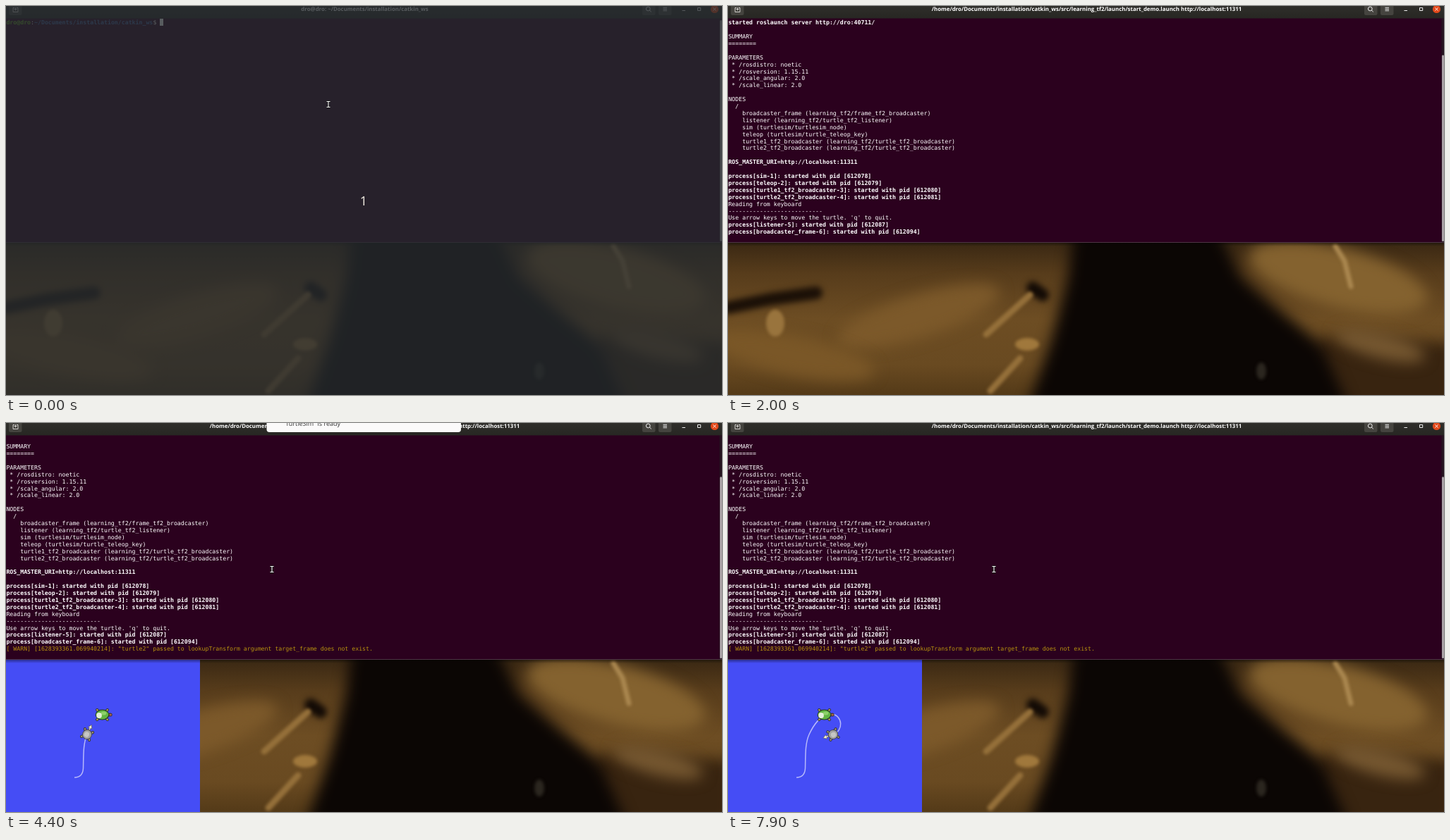
An HTML page with a canvas that plays this animation: 1015 by 552 pixels, repeating every 8 s.

```html
<!DOCTYPE html>
<html lang="en">
<head>
<meta charset="utf-8">
<title>Turtle follower demo</title>
<style>
  html, body { margin: 0; width: 100%; height: 100%; overflow: hidden; background: #000; }
  canvas { display: block; width: 1015px; height: 552px; }
</style>
</head>
<body>
<canvas id="stage" width="1015" height="552"></canvas>
<script>
const W = 1015, H = 552, LOOP = 8000, TICK = 100;
const ROWS = 32, ROW_H = 9.9, COL_W = 4.955, TOP = 18.2, TERM_BOTTOM = 336;
const MONO = '8.23px "DejaVu Sans Mono", monospace';
const UI = '"Open Sans", "Noto Sans", sans-serif';
const USER = 'dro';
const SHELL = `${USER}@${USER}`, CWD = '~/Documents/installation/catkin_ws';
const PROMPT_COLS = (SHELL + ':' + CWD + '$ ').length;
const LAUNCH_FILE = `/home/${USER}/Documents/installation/catkin_ws/src/learning_tf2/launch/start_demo.launch`;

// Lines starting with "!" are bold, with "?" are warnings.
const OUTPUT = `... logging to /home/${USER}/.ros/log/5c1e7a02-f7f1-11eb-9d3c-2b6f04a81e57/roslaunch-${USER}-612063.log
Checking log directory for disk usage. This may take a while.
Press Ctrl-C to interrupt
Done checking log file disk usage. Usage is <1GB.

!started roslaunch server http://${USER}:40711/

SUMMARY
========

PARAMETERS
 * /rosdistro: noetic
 * /rosversion: 1.15.11
 * /scale_angular: 2.0
 * /scale_linear: 2.0

NODES
  /
    broadcaster_frame (learning_tf2/frame_tf2_broadcaster)
    listener (learning_tf2/turtle_tf2_listener)
    sim (turtlesim/turtlesim_node)
    teleop (turtlesim/turtle_teleop_key)
    turtle1_tf2_broadcaster (learning_tf2/turtle_tf2_broadcaster)
    turtle2_tf2_broadcaster (learning_tf2/turtle_tf2_broadcaster)

!ROS_MASTER_URI=http://localhost:11311

!process[sim-1]: started with pid [612078]
!process[teleop-2]: started with pid [612079]
!process[turtle1_tf2_broadcaster-3]: started with pid [612080]
!process[turtle2_tf2_broadcaster-4]: started with pid [612081]
Reading from keyboard
---------------------------
Use arrow keys to move the turtle. 'q' to quit.
!process[listener-5]: started with pid [612087]
!process[broadcaster_frame-6]: started with pid [612094]
?[ WARN] [1628393361.069940214]: "turtle2" passed to lookupTransform argument target_frame does not exist.`.split('\n');

const ctx = document.getElementById('stage').getContext('2d');
const clamp = (v, lo = 0, hi = 1) => Math.min(hi, Math.max(lo, v));

// Value of the last [time, value] step that has been reached.
const at = (t, steps) => steps.filter(s => s[0] <= t).pop()[1];

function rect(x, y, w, h, color, radius = 0, c = ctx) {
  c.fillStyle = color;
  c.beginPath();
  c.roundRect(x, y, w, h, radius);
  c.fill();
}

function ellipse(x, y, rx, ry, color, angle = 0, c = ctx) {
  c.fillStyle = color;
  c.beginPath();
  c.ellipse(x, y, rx, ry, angle, 0, 7);
  c.fill();
}

function stroke(d, color, width = 1, c = ctx) {
  c.strokeStyle = color;
  c.lineWidth = width;
  c.stroke(new Path2D(d));
}

function text(s, x, y, font, color, align = 'left') {
  ctx.font = font;
  ctx.fillStyle = color;
  ctx.textAlign = align;
  ctx.fillText(s, x, y);
}

// Wallpaper: sunlit straw with a dark shadow, reduced to soft shapes.
const wallpaper = (() => {
  const cv = document.createElement('canvas');
  cv.width = W;
  cv.height = H;
  const c = cv.getContext('2d');
  const g = c.createLinearGradient(0, TERM_BOTTOM, 0, H);
  [[0, '#3a2813'], [.2, '#573c1b'], [.5, '#6d4d23'], [.8, '#694a21'], [1, '#543a18']]
    .forEach(stop => g.addColorStop(...stop));
  rect(0, 320, W, H, g, 0, c);
  c.filter = 'blur(10px)';
  ellipse(865, 385, 130, 42, '#84622f', .25, c);
  ellipse(270, 440, 120, 30, '#7c592a', -.3, c);
  ellipse(90, 495, 120, 28, '#7a5727', .2, c);
  c.fillStyle = '#382410';
  c.fill(new Path2D('M840 470L1030 478V570H780Z'));
  ellipse(925, 482, 65, 18, '#755730', .25, c);
  c.fillStyle = '#0b0604';
  c.fill(new Path2D('M490 320H695L728 385 780 430 840 480 880 570H425L458 475 482 385Z'));
  c.filter = 'blur(4px)';
  c.lineCap = 'round';
  stroke('M0 428L60 416 125 407', '#1b1007', 18, c);
  stroke('M432 400L446 410', '#120a05', 18, c);
  c.filter = 'blur(2px)';
  stroke('M366 466L428 410M372 546L414 500', '#95703a', 9, c);
  stroke('M861 341L874 362 883 398', '#ab8850', 7, c);
  ellipse(67, 450, 13, 19, '#99743d', 0, c);
  ellipse(424, 480, 17, 9, '#a0783c', 0, c);
  ellipse(756, 518, 7, 12, '#2b261f', 0, c);
  return cv;
})();

// Three legs of the follower's route and the times at which they begin and end.
const LEGS = [
  'M97 503C104 503 109 499 109.5 490C110 474 109 455 115 442',
  'C120 431 132 411 147 413',
  'C163 415 164 437 149 442'];
const LEG_TIMES = [3100, 4400, 5800, 7900];
const route = document.createElementNS('http://www.w3.org/2000/svg', 'path');
const legEnds = [0, ...LEGS.map((_, i) => {
  route.setAttribute('d', LEGS.slice(0, i + 1).join(''));
  return route.getTotalLength();
})];
const trail = new Path2D(LEGS.join(''));

function travelled(t) {
  return LEGS.reduce((sum, _, i) => sum + (legEnds[i + 1] - legEnds[i]) *
    clamp((t - LEG_TIMES[i]) / (LEG_TIMES[i + 1] - LEG_TIMES[i])), 0);
}

function turtle(x, y, angle, drawBody) {
  ctx.save();
  ctx.translate(x, y);
  ctx.rotate(angle);
  drawBody();
  ctx.restore();
}

function feet(dx, dy, color) {
  for (const sx of [-1, 1]) for (const sy of [-1, 1]) {
    ellipse(sx * dx, sy * dy, 2.5, 2.1, '#2b2a25', sx * sy * .7);
    ellipse(sx * dx, sy * dy, 1.7, 1.3, color, sx * sy * .7);
  }
}

function leader() {
  feet(7, 6.6, '#a99a5c');
  ellipse(11.3, 0, 2.8, 2.5, '#3b2f2a');
  ellipse(11.5, 0, 1.9, 1.6, '#a5624e');
  ellipse(0, 0, 9.8, 7.4, '#24391d');
  ellipse(0, 0, 8.8, 6.4, '#62b543');
  ellipse(2, -2, 4, 2.4, '#8ed16a');
  ellipse(-4.5, 1, 3.9, 3.9, '#e4eedb');
}

function follower() {
  const head = 'M7 -1H10V-3L15 0 10 3V1H7Z';
  feet(5.6, 5.8, '#9c9077');
  ctx.fillStyle = '#f0ecd6';
  ctx.fill(new Path2D(head));
  stroke(head, '#55544e', .6);
  ellipse(0, 0, 7.2, 6.9, '#46464a');
  ellipse(0, 0, 6.3, 6, '#a2a2a2');
  ellipse(-.3, -.5, 3.8, 3.6, '#c6c6c4');
}

function simulator(t) {
  rect(0, TERM_BOTTOM - 10, 275, H, '#454df5');
  const length = travelled(t);
  if (length) {
    ctx.setLineDash([length, 999]);
    ctx.strokeStyle = '#b6b8fb';
    ctx.lineWidth = 1.5;
    ctx.stroke(trail);
    ctx.setLineDash([]);
  }
  const p = route.getPointAtLength(length);
  const a = route.getPointAtLength(Math.max(0, length - .5));
  const b = route.getPointAtLength(length + .5);
  turtle(136.5, 414, 0, leader);
  turtle(p.x, p.y, Math.atan2(b.y - a.y, b.x - a.x), follower);
}

function titleBar(t) {
  const g = ctx.createLinearGradient(0, 0, 0, 17);
  g.addColorStop(0, '#2f2e2a');
  g.addColorStop(1, '#272723');
  rect(0, 0, W, 17.5, g);
  const title = at(t, [[0, `${SHELL}: ${CWD}`], [1400, LAUNCH_FILE],
    [1900, LAUNCH_FILE + ' http://localhost:11311']]);
  text(title, 508.5, 7.2, `bold 7.86px ${UI}`, '#fff', 'center');
  for (const x of [4, 902, 925]) rect(x, -4, 18.5, 17, '#45443f', 2.5);
  stroke('M10 2.5V8.5H17V2.5H15M10 2.5H12M13.5 2V6.5M11.5 4.5H15.5', '#dedcd8', .9);
  stroke('M913.2 4A2.9 2.9 0 1 1 907.4 4A2.9 2.9 0 1 1 913.2 4M912.4 6L914.8 8.4', '#eee', 1);
  stroke('M931.5 2.3H937M931.5 4.5H937M931.5 6.7H937', '#eee', 1);
  stroke('M958.5 6.5H963', '#eee', 1);
  stroke('M980.5 2.5H984.7V6.5H980.5Z', '#eee', 1);
  ellipse(1004.5, 4.5, 5.6, 5.6, '#e2491b');
  stroke('M1002.5 2.5L1006.5 6.5M1006.5 2.5L1002.5 6.5', '#fff', 1);
}

function terminal(t) {
  rect(0, 17, W, TERM_BOTTOM - 17, '#2b011e');
  const printed = at(t, [[0, 0], [1400, 3], [1500, 5], [1900, 29], [2000, 36], [2300, 37]]);
  const total = Math.max(ROWS, printed + 2), first = total - ROWS;
  const command = at(t, [[0, ''], [600, 'clear'],
    [1000, 'roslaunch learning_tf2 start_demo.launch']]);
  const write = (s, col, row, color, bold) =>
    text(s, col * COL_W + .4, TOP + row * ROW_H + 8, (bold ? 'bold ' : '') + MONO, color);

  if (!first) {
    write(SHELL, 0, 0, '#67ae22', true);
    write(':', SHELL.length, 0, '#fff');
    write(CWD, SHELL.length + 1, 0, '#4166a8', true);
    write('$ ' + command, PROMPT_COLS - 2, 0, '#fff');
  }
  OUTPUT.slice(0, printed).forEach((line, i) => {
    const row = i + 1 - first, mark = line[0];
    if (row < 0) return;
    const bold = mark === '!', warning = mark === '?';
    write(bold || warning ? line.slice(1) : line, 0, row, warning ? '#b8930f' : '#fff', bold);
  });

  const blinkOn = t < 1700 || Math.floor((t - 2300) / 600) % 2 === 0;
  if (blinkOn) {
    const col = printed ? 0 : PROMPT_COLS + command.length;
    const row = printed ? printed + 1 - first : 0;
    rect(Math.round(col * COL_W + .4), Math.round(TOP + row * ROW_H), 5, 10, '#fff');
  }

  const thumb = 314 * ROWS / total;
  rect(1011.5, 17.5, 3.5, TERM_BOTTOM - 17.5, '#25131f');
  rect(1012, 334 - thumb, 3, thumb, '#aaa2a6', 1.5);
  rect(0, 335.2, W, .8, '#584650');
  const shade = ctx.createLinearGradient(0, TERM_BOTTOM, 0, TERM_BOTTOM + 5);
  shade.addColorStop(0, 'rgba(0,0,0,.4)');
  shade.addColorStop(1, 'rgba(0,0,0,0)');
  rect(0, TERM_BOTTOM, W, 5, shade);
}

function notification(t) {
  const shown = Math.min(clamp((t - 2200) / 200), clamp((6400 - t) / 200));
  if (!shown) return;
  const y = (shown - 1) * 14;
  rect(369.5, y - 20, 275.5, 33, '#fbfafa', 4);
  text('“TurtleSim” is ready', 393, y + 3.8, `9px ${UI}`, '#333');
}

function pointer(t) {
  if (t >= 400 && t < 2600) return;
  const k = clamp((t - 2600) / 300), e = k * k * (3 - 2 * k);
  ctx.save();
  ctx.translate(457 - 80 * e, 139.5 + 68 * e);
  const beam = 'M-2.5 -4H2.5M0 -4V4M-2.5 4H2.5';
  stroke(beam, '#111', 2.4);
  stroke(beam, '#fff', 1.1);
  ctx.restore();
}

function draw(t) {
  ctx.textRendering = 'geometricPrecision';
  ctx.drawImage(wallpaper, 0, 0);
  if (t >= 2200) simulator(t);
  terminal(t);
  titleBar(t);
  notification(t);
  if (t < 400) {
    rect(0, 0, W, H, 'rgba(38,44,48,.77)');
    text('1', 507, 282.5, `18px ${UI}`, '#f7f1e6', 'center');
  }
  pointer(t);
}

function frame() {
  const t = performance.now() % LOOP;
  draw(Math.floor(t / TICK) * TICK);
  requestAnimationFrame(frame);
}
frame();
</script>
</body>
</html>
```
